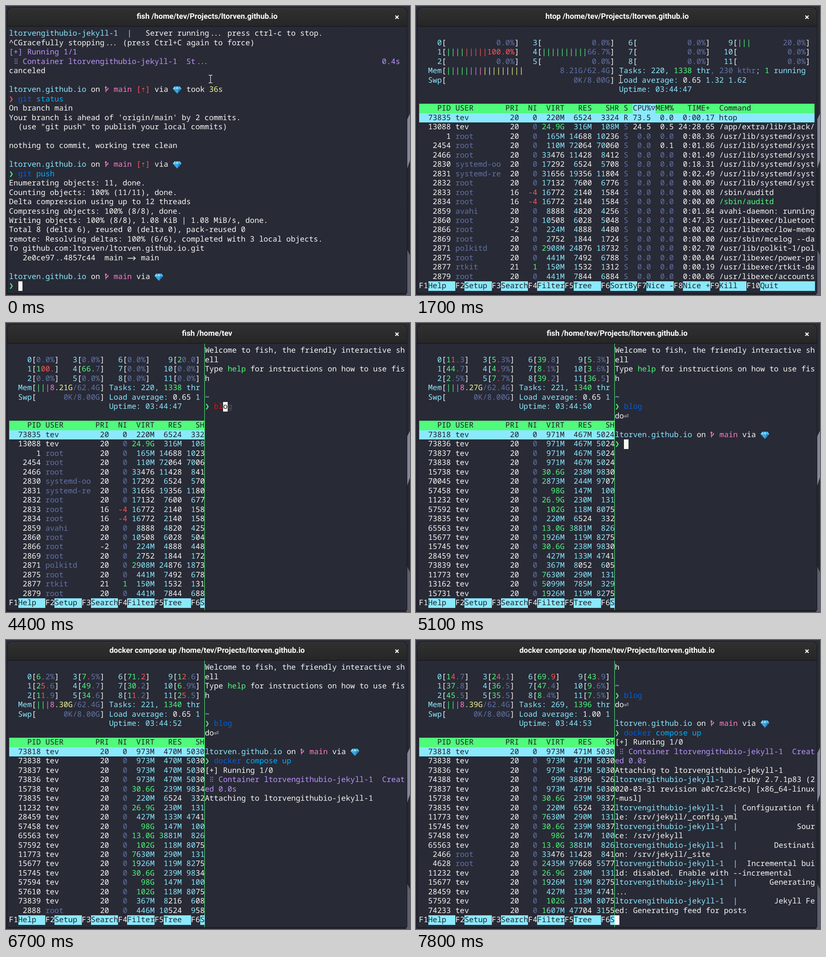
An HTML page that plays this animation: 884 by 633 pixels, repeating every 8 s.

```html
<!DOCTYPE html>
<html lang="en">
<head>
<meta charset="utf-8">
<title>Terminal session</title>
<style>
  html, body { margin: 0; width: 100%; height: 100%; overflow: hidden; }
  body { position: relative; background: linear-gradient(#2b2d39, #23242e); }
  #edge { position: absolute; left: 0; top: 0; }
  #win {
    position: absolute; left: 3px; top: 4px; width: 874px; height: 625px;
    border-radius: 10px 10px 2px 2px; background: #282a36; overflow: hidden;
    box-shadow: 0 0 0 1px #15161c;
  }
  #bar {
    height: 40px; border-bottom: 1px solid #111; color: #fff;
    background: linear-gradient(#303030, #262626); box-shadow: inset 0 1px #3c3c3c;
    font: 700 16.7px/40px Roboto, "Noto Sans", sans-serif; text-align: center;
    text-rendering: geometricPrecision; white-space: pre;
  }
  #close, #beam, #rule { position: absolute; }
  #close { left: 850px; top: 19px; }
  #beam { left: 442px; top: 149px; }
  #rule { left: 434px; top: 45px; width: 1px; height: 584px; background: #50fa7b; }
  #screen {
    position: absolute; left: 0; top: 0; width: 884px; height: 633px;
    font: 16.59px/18.4px "Noto Sans Mono", "DejaVu Sans Mono", monospace;
    font-variant-ligatures: none; text-rendering: geometricPrecision;
  }
  #screen span { position: absolute; height: 20.48px; white-space: pre; }
  #screen svg { display: block; overflow: visible; }
  #screen .dots { letter-spacing: -2.2px; }
</style>
</head>
<body>
<svg id="edge" width="884" height="633">
  <path d="M884 236L876 252V362L884 338Z" fill="#84869c"/>
  <path d="M876 530L884 546V633H876Z" fill="#5c5e72"/>
</svg>
<div id="win"><div id="bar"></div></div>
<svg id="close" width="11" height="11"><path d="M2 2L9 9M9 2L2 9" stroke="#fff" stroke-width="2.2"/></svg>
<div id="rule"></div>
<div id="screen"></div>
<svg id="beam" width="11" height="22" fill="none">
  <defs><path id="stem" d="M1.5 2.5H4L5.5 3.5L7 2.5H9.5M5.5 3.5V18.5M1.5 19.5H4L5.5 18.5L7 19.5H9.5"/></defs>
  <use href="#stem" stroke="#111" stroke-width="3"/>
  <use href="#stem" stroke="#fff" stroke-width="1.3"/>
</svg>
<script>
const CELL_W = 9.954, CELL_H = 20.48, TOP = 50.38;
const LEFT_X = 6.6, RIGHT_X = 435.13, FULL = 87, LEFT = 43, RIGHT = 44;
const LOOP = 8000;
const DARK = '#1e1f29', WHITE = '#f8f8f2';

// "§x" in a line switches to colour x; capitals are dark text on that colour.
const COLORS = {
  w: WHITE, c: '#8be9fd', g: '#50fa7b', b: '#6272a4', r: '#ff5555', p: '#bd93f9',
  k: '#ff79c6', y: '#f1fa8c', d: '#005fd7', l: '#00afff', e: '#e80c10', s: '#555555'
};

const svg = (w, body) => `<svg width="${w}" height="20">${body}</svg>`;
const line = (d, w = 1.4) => `<path d="${d}" fill="none" stroke="currentColor" stroke-width="${w}"/>`;
const dots = [4.6, 9, 13.4].map(y =>
  `<circle cx="3" cy="${y}" r="1.1"/><circle cx="7" cy="${y}" r="1.1"/>`).join('');
// Each icon: width in cells, drawing.
const ICONS = {
  '💎': [2, svg(20, '<path d="M4 3H15L19 8.5L9.5 19L0 8.5Z" fill="#3aa6e0"/>' +
    '<path d="M4 3L6 8.5H0ZM9.5 3L13 8.5H6Z" fill="#8fe0f8"/>' +
    '<path d="M15 3L19 8.5H13Z" fill="#5cc4ee"/><path d="M13 8.5H19L9.5 19Z" fill="#1f7fc4"/>')],
  '⎇': [1, svg(10, line('M2.5 15.5V3.5M.7 6.2L2.5 3.7L4.3 6.2M2.5 12.5L7 9.2V6', 1.7))],
  '⠿': [1, svg(10, `<g fill="currentColor">${dots}</g>`)],
  '▽': [1, svg(CELL_W, line('M1 6H9L5 13.5Z', 1.2))],
  '->': [2, svg(20, line('M1 10.5H18M13.5 6.3L18 10.5L13.5 14.7'))]
};
const TOKEN = /💎|⎇|⠿|▽|->|\.{2,3}|[❯⇡⏎]|(?:(?!💎|⎇|⠿|▽|->|\.\.|[❯⇡⏎]).)+/gu;

const bar = document.getElementById('bar');
const rule = document.getElementById('rule');
const screen = document.getElementById('screen');
const beam = document.getElementById('beam');

function put(x, y, text, ink, fill) {
  const el = document.createElement('span');
  el.style.left = x + 'px';
  el.style.top = y + 'px';
  el.style.color = ink;
  if (fill) el.style.background = fill;
  if (ICONS[text]) el.innerHTML = ICONS[text][1];
  else el.textContent = text;
  screen.append(el);
  return el;
}

function drawLines(lines, x0, width, wrap, top = 0) {
  let row = -top;
  for (const text of lines) {
    let col = 0;
    for (const part of ('w' + text).split('§')) {
      const key = part[0], low = key.toLowerCase(), inverse = key !== low;
      for (let rest of part.slice(1).match(TOKEN) || []) {
        while (rest) {
          if (col >= width) {
            if (!wrap) break;
            col = 0;
            row++;
          }
          const icon = ICONS[rest];
          const bit = icon ? rest : rest.slice(0, width - col);
          if (row >= 0 && (bit.trim() || inverse)) {
            const tight = /^\.{2,3}$/.test(bit);
            const el = put(x0 + col * CELL_W + (tight ? 2.2 : 0), TOP + row * CELL_H, bit,
              inverse ? DARK : COLORS[low], inverse && COLORS[low]);
            if (tight) el.className = 'dots';
          }
          col += icon ? icon[0] : bit.length;
          rest = rest.slice(bit.length);
        }
      }
    }
    row++;
  }
}

// ---- shell text ----
const ME = 'tev', REPO = 'ltorven.github.io', BOX = 'ltorvengithubio-jekyll-1';
const HOME = '/home/' + ME, SITE = `${HOME}/Projects/${REPO}`;
const prompt = (ahead, end = '') => `§c${REPO}§w on §k⎇ main${ahead ? ' §r[⇡]' : ''}§w via 💎${end}`;
const cmd = (text = '', ghost = '', sign = 'g') => `§${sign}❯ ${text}§s${ghost}`;

const gitLog = [
  `§c${BOX}  |§w   Server running... press ctrl-c to stop.`,
  '^CGracefully stopping... (press Ctrl+C again to force)',
  '§p[+] Running 1/1',
  `§p ⠿ Container ${BOX}  St...`.padEnd(84) + '0.4s',
  'canceled', '',
  prompt(true, ' took §y36s'),
  cmd('§dgit §lstatus', '', 'r'),
  'On branch main',
  "Your branch is ahead of 'origin/main' by 2 commits.",
  '  (use "git push" to publish your local commits)', '',
  'nothing to commit, working tree clean', '',
  prompt(true),
  cmd('§dgit §lpush'),
  'Enumerating objects: 11, done.',
  'Counting objects: 100% (11/11), done.',
  'Delta compression using up to 12 threads',
  'Compressing objects: 100% (8/8), done.',
  'Writing objects: 100% (8/8), 1.08 KiB | 1.08 MiB/s, done.',
  'Total 8 (delta 6), reused 0 (delta 0), pack-reused 0',
  'remote: Resolving deltas: 100% (6/6), completed with 3 local objects.',
  `To github.com:ltorven/${REPO}.git`,
  '   2e0ce97..4857c44  main -> main', '',
  prompt()
];
const git = (...input) => [...gitLog, cmd(...input)];

const welcome = [
  'Welcome to fish, the friendly interactive shell',
  'Type §ghelp§w for instructions on how to use fish', '', '§c~'
];
const blog = (...input) => [...welcome, cmd(...input)];
const repo = (...input) => [...blog('§dblog'), 'do⏎', '', prompt(), cmd(...input)];
const up = repo('§ddocker §lcompose up');
const created = [...up, '[+] Running 1/0', `§p ⠿ Container ${BOX}  Created 0.0s`];
const attached = [...created, `Attaching to ${BOX}`];
const log = text => `§c${BOX}  |§w${text}`;
const ruby = [...attached, log(' ruby 2.7.1p83 (2020-03-31 revision a0c7c23c9c) [x86_64-linux-musl]')];
const served = [
  ...ruby,
  log(' Configuration file: /srv/jekyll/_config.yml'),
  log(' '.repeat(13) + 'Source: /srv/jekyll'),
  log(' '.repeat(8) + 'Destination: /srv/jekyll/_site'),
  log('  Incremental build: disabled. Enable with --incremental'),
  log(' '.repeat(7) + 'Generating...'),
  log(' '.repeat(8) + 'Jekyll Feed: Generating feed for posts')
];

// ---- htop ----
const pad = (text, n, color) => `§${color}${text.padStart(n)}`;
function size(text) {
  const lead = ' '.repeat(6 - text.length);
  const [, head, tail] = text.match(/^(\d+)(\d{3}M?)$/) || [];
  if (text.endsWith('G')) return '§g' + lead + text;
  if (!head) return '§c' + lead + text;
  return text.endsWith('M') ? `§g${lead}${head}§c${tail}` : `§c${lead}${head}§w${tail}`;
}
function process(entry) {
  const [pid, user, pri, ni, virt, res, shr, cpu = '0.0', mem = '0.0', time = '', ...rest] = entry.split(' ');
  const dim = v => +v ? 'w' : 'b';
  return pad(pid, 7, 'w') + (user === ME ? ' ' : '§b ') + user.padEnd(10) + pad(pri, 4, 'w') +
    pad(ni, 4, +ni < 0 ? 'r' : +ni ? 'g' : 'b') + size(virt) + size(res) + size(shr) +
    (rest[0] === 'htop' ? '§g R' : '§b S') + pad(cpu, 5, dim(cpu)) + pad(mem, 5, dim(mem)) +
    pad(time, 9, 'w') + ' ' + rest.join(' ');
}

const HEADER = '§G    PID USER       PRI  NI  VIRT   RES   SHR S §CCPU%▽§GMEM%   TIME+  ' + 'Command'.padEnd(21);
const KEYS = ['Help', 'Setup', 'Search', 'Filter', 'Tree', 'SortBy', 'Nice -', 'Nice +', 'Kill', 'Quit']
  .map((name, i) => `§wF${i + 1}§C${name.padEnd(i < 9 ? 6 : 12)}`).join('');

function cpuRows(body) {
  return [0, 1, 2].map(r => [5, 4, 4, 5].map((n, c) => {
    const i = c * 3 + r;
    return `${pad(String(i), n, 'c')}§w[${body(i)}§w]`;
  }).join(''));
}
function htop(meters, entries) {
  const rows = entries.map(process);
  rows[0] = '§C' + rows[0].replace(/§./g, '').padEnd(FULL);
  return ['', ...meters, '', HEADER, ...rows, KEYS];
}

const first = `73835 ${ME} 20 0 220M 6524 3324 73.5 0.0 0:00.17 htop
13088 ${ME} 20 0 24.9G 316M 108M 24.5 0.5 24:28.65 /app/extra/lib/slack/
1 root 20 0 165M 14688 10236 0.0 0.0 0:08.36 /usr/lib/systemd/syst
2454 root 20 0 110M 72064 70060 0.0 0.1 0:01.86 /usr/lib/systemd/syst
2466 root 20 0 33476 11428 8412 0.0 0.0 0:01.49 /usr/lib/systemd/syst
2830 systemd-oo 20 0 17292 6524 5708 0.0 0.0 0:18.31 /usr/lib/systemd/syst
2831 systemd-re 20 0 31656 19356 11804 0.0 0.0 0:02.49 /usr/lib/systemd/syst
2832 root 20 0 17132 7600 6776 0.0 0.0 0:00.09 /usr/lib/systemd/syst
2833 root 16 -4 16772 2140 1584 0.0 0.0 0:00.08 /sbin/auditd
2834 root 16 -4 16772 2140 1584 0.0 0.0 0:00.00 §g/sbin/auditd
2859 avahi 20 0 8888 4820 4256 0.0 0.0 0:01.84 avahi-daemon: running
2860 root 20 0 10508 6028 5048 0.0 0.0 0:47.35 /usr/libexec/bluetoot
2866 root -2 0 224M 4888 4480 0.0 0.0 0:00.02 /usr/libexec/low-memo
2869 root 20 0 2752 1844 1724 0.0 0.0 0:00.00 /usr/sbin/mcelog --da
2871 polkitd 20 0 2908M 24876 18732 0.0 0.0 0:02.70 /usr/lib/polkit-1/pol
2875 root 20 0 441M 7492 6788 0.0 0.0 0:00.04 /usr/libexec/power-pr
2877 rtkit 21 1 150M 1532 1312 0.0 0.0 0:00.19 /usr/libexec/rtkit-da
2879 root 20 0 441M 7844 6884 0.0 0.0 0:00.06 /usr/libexec/accounts`.split('\n');

const wideCpu = { 1: '§g||||§r|||||100.0%', 4: '§g||||||||||§b66.7%', 9: '§g|||§b' + '20.0%'.padStart(12) };
const wide = htop([
  ...cpuRows(i => wideCpu[i] || pad('0.0%', 15, 'b')),
  `§c  Mem§w[§g|||||§p||§k|§y|||||||||${pad('8.21G/62.4G', 19, 'b')}§w] ` +
    '§cTasks: 220, §g1338§c thr§b, 230 kthr§c; §g1§c running',
  `§c  Swp§w[${pad('0K/8.00G', 36, 'b')}§w] §cLoad average: §w0.65 §c1.32 1.62`,
  '§c' + 'Uptime: 03:44:47'.padStart(60)
], first);

// Each load is "text" or "text/gr" with explicit green and red cell counts.
function narrowMeters(loads, mem, tasks, threads, load, clock) {
  const list = loads.split(' ');
  return [
    ...cpuRows(i => {
      const [text, split] = list[i].split('/'), v = parseFloat(text);
      const g = split ? +split[0] : Math.ceil(v * 0.036);
      const r = g + (split ? +split[1] : +(v >= 4));
      return `§g${text.slice(0, g)}§r${text.slice(g, r)}§b${text.slice(r)}`;
    }),
    `§c  Mem§w[§g||§p|§k8§y.${mem}G§b/62.4G§w] §cTasks: ${tasks}, §g${threads}§c thr`,
    `§c  Swp§w[${pad('0K/8.00G', 14, 'b')}§w] §cLoad average: §w${load} §c1`,
    '§c' + ('Uptime: 03:44:' + clock).padStart(38)
  ];
}

const usage = {
  70045: '2873M 244M 97070', 57458: '98G 147M 100M', 11232: '26.9G 230M 131M', 57592: '102G 118M 80750',
  73835: '220M 6524 3324', 65563: '13.0G 3881M 826M', 15677: '1926M 119M 82750', 28459: '427M 133M 47410',
  11773: '7630M 290M 131M', 13162: '5099M 785M 329M', 2888: '446M 10524 9580', 74388: '99M 38896 5260',
  2466: '33476 11428 8412', 4628: '2435M 97668 55770', 74233: '1607M 47704 31550'
};
Object.assign(usage, { 15731: usage[15677], 57594: usage[57458], 57610: usage[57592] });
const table = (pids, app, web, tail) => pids.split(' ').map(pid => {
  const user = [2888, 2466, 4628].includes(+pid) ? 'root' : ME;
  const use = usage[pid] || (/^15/.test(pid) ? web : pid === '73839' ? tail : app);
  return `${pid} ${user} 20 0 ${use}`;
});

const idle = '0.0%/00';
const narrow = [
  htop(narrowMeters([idle, '100./13', idle, idle, '66.7/30', idle, idle, idle, idle, '20.0/10', idle, idle].join(' '),
    '21', 220, 1338, '0.65', 47), first),
  htop(narrowMeters('11.3 44.7 2.5% 5.3% 4.9% 7.7% 39.8 8.1% 39.2 5.3% 3.6% 36.5', '27', 221, 1340, '0.65', 50),
    table('73818 73836 73837 73838 15738 70045 57458 11232 57592 73835 65563 15677 15745 28459 73839 11773 13162 15731',
      '971M 467M 50240', '30.6G 238M 98300', '367M 8052 6050')),
  htop(narrowMeters('6.2% 25.6 11.9 7.5% 49.7 34.6 71.2 30.2 11.2 12.6 6.9% 25.5', '30', 221, 1340, '0.65', 52),
    table('73818 73838 73837 73836 15738 73835 11232 28459 57458 65563 57592 11773 15677 15745 57594 57610 73839 2888',
      '973M 470M 50300', '30.6G 239M 98340', '367M 8216 6080')),
  htop(narrowMeters('14.7 37.8 45.5 24.1 36.5 35.5 69.9 47.4 8.4% 43.9 9.6% 7.5%', '39', 269, 1396, '1.00', 53),
    table('73818 73838 73836 74388 73837 15738 73835 11773 15745 57458 65563 2466 4628 11232 15677 28459 57592 74233',
      '973M 471M 50300', '30.6G 239M 98370'))
];

// ---- timeline: each step changes only what it names; cur is [col, row, char] ----
const steps = [
  [0, { title: 'fish ' + SITE, left: git(), right: null, cur: [2, 27], top: 0 }],
  [200, { cur: null }],
  [400, { left: git('§eht', 'op'), cur: [4, 27, 'o'] }],
  [700, { left: git('§ehto', 'p'), cur: [5, 27, 'p'] }],
  [1000, { left: git('§dhtop'), cur: [6, 27] }],
  [1400, { title: 'htop ' + SITE, left: [], cur: null }],
  [1700, { left: wide }],
  [3300, { title: 'fish ' + HOME, left: narrow[0], right: blog(), cur: [2, 6] }],
  [3900, { cur: null }],
  [4300, { right: blog('§eb', 'log'), cur: [3, 6, 'l'] }],
  [4400, { right: blog('§ebl', 'og'), cur: [4, 6, 'o'] }],
  [4600, { left: narrow[1], right: blog('§dblog'), cur: [6, 6] }],
  [4800, { title: 'blog ' + HOME, cur: [0, 7] }],
  [5100, { title: 'fish ' + SITE, right: repo(), cur: [2, 10] }],
  [5200, { right: repo('§edo', 'cker compose up'), cur: [4, 10, 'c'] }],
  [5400, { right: repo('§edock', 'er compose up'), cur: [6, 10, 'e'] }],
  [5500, { right: repo('§edocke', 'r compose up'), cur: [7, 10, 'r'] }],
  [5600, { right: repo('§ddocker', ' compose up'), cur: [8, 10] }],
  [5900, { right: up, cur: [19, 10] }],
  [6100, { title: 'docker compose up ' + SITE, left: narrow[2], cur: [0, 11] }],
  [6200, { right: created, cur: [0, 14] }],
  [6300, { right: attached, cur: [0, 15] }],
  [6700, { cur: null }],
  [7000, { right: ruby }],
  [7300, { cur: [0, 18] }],
  [7600, { left: narrow[3] }],
  [7800, { right: served, top: 3, cur: [0, 27] }]
];
let state = {};
const states = steps.map(([, change]) => state = { ...state, ...change });

function paint({ title, left, right, cur, top }) {
  bar.textContent = title;
  beam.style.display = right ? 'none' : '';
  rule.style.display = right ? '' : 'none';
  screen.textContent = '';
  drawLines(left, LEFT_X, right ? LEFT : FULL, false);
  if (right) drawLines(right, RIGHT_X, RIGHT, true, top);
  if (cur) {
    const [col, row, char = ''] = cur;
    put((right ? RIGHT_X : LEFT_X) + col * CELL_W, TOP + row * CELL_H, char, DARK, WHITE)
      .style.width = CELL_W + 'px';
  }
}

const start = performance.now();
let shown = -1;
function tick() {
  const t = (performance.now() - start) % LOOP;
  const i = steps.findLastIndex(([at]) => at <= t);
  if (i !== shown) paint(states[shown = i]);
  requestAnimationFrame(tick);
}
tick();
</script>
</body>
</html>
```
